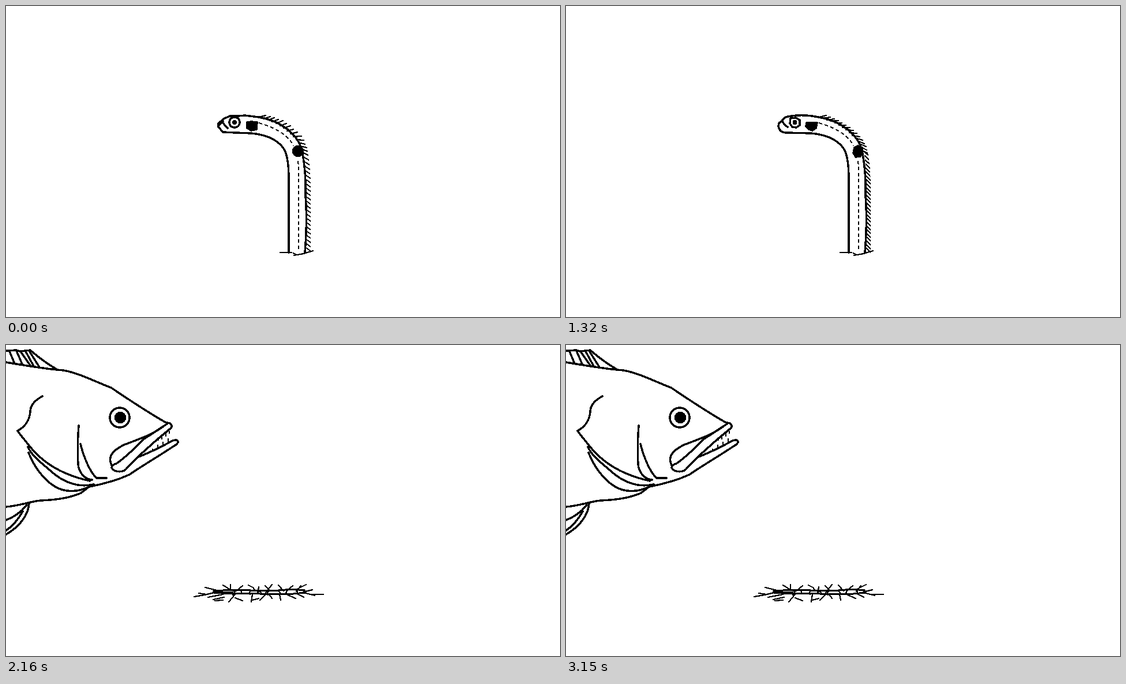
An HTML page without scripts for the animation above (3180 ms loop, 960x540 px).

```html
<!DOCTYPE html>
<html lang="en">
<head>
<meta charset="utf-8">
<title>Garden eel hides</title>
<style>
html, body { margin: 0; width: 100%; height: 100%; overflow: hidden; background: #fff; }
svg { display: block; width: 960px; height: 540px; overflow: hidden; }
.ink { fill: none; stroke: #000; stroke-width: 3.5; stroke-linecap: round; stroke-linejoin: round; shape-rendering: crispEdges; }
.thin { stroke-width: 2.2; }
.solid { fill: #000; }
.dash { stroke-width: 2; stroke-linecap: butt; stroke-dasharray: 6 4.5; }
.fringe { stroke-width: 8; stroke-linecap: butt; stroke-dasharray: 2.4 5; }
.fringe.dense { stroke-dasharray: 3 3.6; }

/* Redrawn poses sit on a vertical strip; "rewind" keeps the cycle in phase with the loop. */
.rewind { animation: rewind 9.54s steps(3) -1ms infinite; }
.cycle { animation: cycle 90ms steps(3) -1ms infinite; }
@keyframes rewind { to { transform: translateY(1800px); } }
@keyframes cycle { to { transform: translateY(-1800px); } }

.awake, .hole, .falling, .arriving, .hunting, .burrow { animation: 3.18s step-end -1ms infinite; }
.awake { animation-name: awake; }
.hole { animation-name: hole; }
.falling { animation-name: falling; }
.arriving { animation-name: arriving; }
.hunting { animation-name: hunting; }
.burrow { animation-name: burrow; }
@keyframes awake { 0% { opacity: 1; } 58.491%, to { opacity: 0; } }
@keyframes hole { 0% { opacity: 1; } 63.208%, to { opacity: 0; } }
@keyframes falling { 0% { opacity: 0; } 58.491% { opacity: 1; } 63.208%, to { opacity: 0; } }
@keyframes arriving { 0% { opacity: 1; } 62.264%, to { opacity: 0; } }
@keyframes hunting { 0% { opacity: 0; } 62.264%, to { opacity: 1; } }
@keyframes burrow { 0% { opacity: 0; } 63.208%, to { opacity: 1; } }

.drop { animation: drop 3.18s step-end -1ms infinite; }
@keyframes drop {
  0% { transform: translateY(-120px); }
  58.491% { transform: translateY(-120px); animation-timing-function: steps(5); }
  63.208%, to { transform: translateY(80px); }
}
.slide { animation: slide 3.18s step-end -1ms infinite; }
@keyframes slide {
  0% { transform: translateX(-320px); }
  54.717% { transform: translateX(-320px); animation-timing-function: steps(8); }
  62.264%, to { transform: translateX(0); }
}
</style>
</head>
<body>
<svg viewBox="0 0 960 540" role="img" aria-label="An eel hides in its burrow as a big fish arrives">
<defs>
  <clipPath id="ground"><path d="M0 0H960V429H0z"/></clipPath>

  <!-- Eel -->
  <g id="eelBase">
    <path d="M425 221C460 224 478 239 484 253C489 266 490 285 490 300V428"/>
    <path d="M438 193C475 199 508 222 514 256C518 280 520 305 519 330C521 355 521 390 518 428"/>
    <path class="dash" d="M438 203C466 211 490 224 498 243"/>
    <path class="dash" d="M506 269C508 285 507 300 507 425"/>
  </g>
  <g id="hairA" class="thin">
    <path d="M438 193l12-3M446 196l12-4M454 198l11-4M461 201l11-4M468 204l12-5M475 208l11-4M481 212l12-4M487 217l11-3M493 222l12-3M498 227l14-1M503 232l13 1M507 237l11 3M510 243l11 3M512 249l10 3"/>
    <path class="fringe" transform="translate(520 256) skewY(36)" d="M0 0C3 15 3 28 4 42V168"/>
  </g>
  <g id="hairB" class="thin">
    <path d="M438 193l13-3M445 195l13-2M452 198l13-2M459 200l13-1M466 203l12 0M473 207l12 0M479 211l13 0M485 215l13 1M491 220l13 1M496 225l13 2M501 229l13 4M505 234l12 5M508 239l12 5M511 245l10 5M512 250l10 5"/>
    <path class="fringe dense" transform="translate(520 254) skewY(45)" d="M0 0C3 15 3 28 4 42V168"/>
  </g>
  <g id="headA">
    <path d="M438 193L414 190L402 191L388 191L377 196L368 204L368 210L376 219L398 220L425 221M373 200L384 212M369 207L376 200"/>
    <circle cx="396" cy="202" r="9"/><circle class="solid" cx="396" cy="202" r="2.5"/>
    <path class="solid" d="M418 202l7-1 10 1-1 12-9 2-7-4z"/>
    <circle class="solid" cx="506" cy="252" r="8.5"/>
  </g>
  <g id="headB">
    <path d="M438 193C420 189 400 189 384 192C379 193 376 196 375 200Q368 201 368 209Q370 220 382 220L425 221M375 198C376 204 380 208 384 210"/>
    <path d="M389 195l9-1 7 4v9l-6 4-7-1-4-6z"/><path class="solid" d="M395 200h3v4h-3z"/>
    <path class="solid" d="M417 203h18l-2 9-6 4-6-2-5-5z"/>
    <path class="solid" d="M506 243l7 3 1 7-4 8-8 1-4-7 2-9z"/>
  </g>
  <g id="eelA"><use href="#eelBase"/><use href="#hairA"/><use href="#headA"/></g>
  <g id="eelB"><use href="#eelBase"/><use href="#hairB"/><use href="#headB"/></g>
  <g id="eelC"><use href="#eelBase"/><use href="#hairB"/><use href="#headA"/></g>

  <!-- Fish -->
  <g id="fishA">
    <path d="M0 30C35 36 70 42 100 44C130 50 155 64 182 74C213 95 246 117 276 134L284 136Q289 140 286 144L262 164L232 191L210 213C204 223 186 221 183 213Q184 208 191 206C208 195 222 180 238 164L279 137"/>
    <path d="M272 142C250 158 225 165 203 174C184 184 176 194 183 209"/>
    <path d="M20 149C26 158 33 165 41 176C60 199 88 223 145 236"/>
    <path d="M38 177C46 195 66 208 80 221C100 238 125 248 152 242"/>
    <path d="M39 187C52 220 78 250 106 253C125 255 136 250 144 246"/>
    <path d="M126 140C124 165 124 190 125 208C127 222 136 233 149 234"/>
    <path d="M129 172C135 195 145 220 157 231L174 231"/>
    <path d="M230 194C252 186 272 175 289 166Q298 163 298 169Q296 173 290 176C265 193 240 207 214 225C190 236 170 241 145 246"/>
    <path d="M283 150v3M277 154v4M270 159v4M264 163v2M254 181v3M263 174v4M272 169v4M281 163v4" class="thin"/>
    <circle cx="197" cy="126" r="17"/><circle class="solid" cx="198" cy="126" r="8.5"/>
    <path d="M63 89C50 96 42 105 42 116C41 130 33 142 20 149"/>
    <path d="M0 281C25 279 40 272 60 270C90 269 112 265 130 257L144 246"/>
    <path d="M0 10L18 9L24 11L42 9C56 21 70 32 86 41M6 11L14 30M18 10L28 33M25 11L41 34M34 11L47 35M40 10L57 37"/>
  </g>
  <g id="fishB">
    <path d="M0 29C30 34 60 41 88 43C110 46 125 51 140 59C160 67 178 77 194 84Q210 90 218 99L245 117L277 135L284 135Q289 140 286 145L262 165L245 180L212 214C205 222 189 222 184 214Q183 208 191 206C208 195 225 178 238 164L277 136"/>
    <path d="M272 142C252 158 228 164 205 171C186 179 177 188 184 212"/>
    <path d="M20 150C28 155 33 164 41 172C66 202 92 222 146 235"/>
    <path d="M37 172C44 192 60 203 72 216C100 238 128 248 174 237"/>
    <path d="M39 187C48 216 74 249 104 253C124 255 135 250 144 246"/>
    <path d="M126 141C124 170 123 194 125 207C128 219 134 230 146 235"/>
    <path d="M131 174C137 198 150 222 162 232L174 237"/>
    <path d="M218 204C240 192 268 183 287 175L299 173L299 180L291 181C268 193 245 213 212 227C190 236 170 241 145 246"/>
    <path d="M284 149v5M276 154v5M270 160h4M264 163v4M254 184v4M263 180v4M273 177v5M283 171v4" class="thin"/>
    <path d="M187 109l13-1 11 3 3 10-1 15-8 7-14 0-9-6-4-10 2-10z"/>
    <path class="solid" d="M188 119l8-1 8 2 1 10-3 5-10 1-4-8z"/>
    <path d="M63 86C46 91 43 99 42 113C40 130 33 141 20 150"/>
    <path d="M0 281H18L35 273C62 273 82 268 100 264C124 261 132 253 144 246"/>
    <path d="M0 5L10 8L18 9L28 5L40 8C56 22 70 30 88 41M4 8L11 30M15 9L26 33M27 7L40 34M36 9L54 36"/>
  </g>
  <path id="finA" d="M40 276C38 296 24 315 0 329M36 278C26 290 14 299 0 304M29 289C21 303 11 315 0 322"/>
  <path id="finB" d="M46 275C40 295 20 312 0 317M36 275C26 284 12 293 0 298M41 281C32 294 16 305 0 310"/>
  <path id="finC" d="M40 276C38 298 24 322 0 335M36 278C26 292 14 303 0 309M29 289C21 307 11 320 0 328"/>
  <g id="poseA"><use href="#fishA"/><use href="#finA"/></g>
  <g id="poseB"><use href="#fishB"/><use href="#finB"/></g>
  <g id="poseC"><use href="#fishA"/><use href="#finC"/></g>
</defs>

<g class="ink">
  <g class="awake"><g class="rewind"><g class="cycle">
    <use href="#eelC" y="-1200"/><use href="#eelB" y="-600"/><use href="#eelA"/><use href="#eelC" y="600"/><use href="#eelB" y="1200"/>
  </g></g></g>

  <g class="hole thin"><path d="M475 428H495M498 429L503 432M499 433L516 430L532 425"/></g>

  <!-- Eel pulled down, as vertical streaks -->
  <g class="falling thin" clip-path="url(#ground)"><g class="drop">
    <path d="M367 351V376Q368 381 373 381M371 357v8M376 345v24M383 347v8M380 364v9M388 349V366Q390 373 396 373Q404 373 404 364V348M396 338v26M408 335v15M413 346v9M376 366l7 8h-5"/>
    <path d="M374 381h3M382 382h2M390 380h8M403 381h6M414 381h14M375 377v4M388 377v5M411 377v4"/>
    <path class="solid" d="M419 358h15v15l-4 4h-8l-3-4z"/>
    <path d="M418 348v22M422 351v20M426 334v30M430 336v26M433 347v22"/>
    <path d="M442 350v8M447 346v11M451 347v13M457 348v13M464 352v13M470 348v19M475 356v14M480 355v16M485 360v17M489 362v20M495 366v20M500 371v22M504 375v22M508 378v20M512 384v19"/>
    <path d="M442 367v4M447 366v6M452 368v6M457 370v6M462 372v4M467 375v6M479 379v6M487 385v8M493 392v10"/>
    <path d="M433 376v11M441 380v7M448 383v7M455 387v3M461 388v5M467 389v9M473 393v11M478 399v13M482 402v15M485 405v19M489 409v20"/>
    <path d="M500 403v20M503 397v25M506 396v27M509 398v25M512 404v17M517 407v22M521 415v14"/>
    <path class="solid" d="M501 404h11v15l-3 3h-6l-2-4z"/>
    <path stroke-dasharray="22 9" d="M489 438V570M507 440V570M518 436V570M524 432V570"/>
  </g></g>

  <!-- Closed burrow -->
  <g class="burrow thin">
    <path stroke-width="3" d="M359 427L376 426L398 425L424 426L446 426L472 426L496 424L518 426M360 430L386 432L412 431L440 432L468 432L498 432L519 430"/>
    <path stroke-width="5" d="M361 428L376 430L392 430"/>
    <path d="M326 437L344 434L360 430M334 431L348 433M345 421L362 425L371 428M350 438L376 433M359 442L378 438M376 417L389 425L397 428M389 416V426M410 418L399 427M420 417L428 421L432 427M438 420L436 432M461 416L450 430M449 418L456 425M472 417L481 427M497 418L486 427M506 423L520 416M503 428L511 418M515 429L531 425M520 431L535 435M526 433H550M362 444L376 443"/>
    <path d="M395 426Q398 430 393 434M406 426Q410 429 406 432M424 427Q420 430 423 433M437 427Q444 429 441 433M457 426Q451 430 454 434M472 427Q477 430 474 433M488 426Q484 430 486 433M503 426Q507 429 504 432M514 426Q519 428 517 431M397 433L386 446M397 439L410 444M427 433L425 446M427 443L438 440M450 433L440 443M456 433L461 440M474 433L476 443M486 433L502 440M505 432L516 438"/>
  </g>

  <g class="arriving"><g class="slide"><use href="#poseA"/></g></g>
  <g class="hunting"><g class="rewind"><g class="cycle">
    <use href="#poseC" y="-1200"/><use href="#poseB" y="-600"/><use href="#poseA"/><use href="#poseC" y="600"/><use href="#poseB" y="1200"/>
  </g></g></g>
</g>
</svg>
</body>
</html>
```
